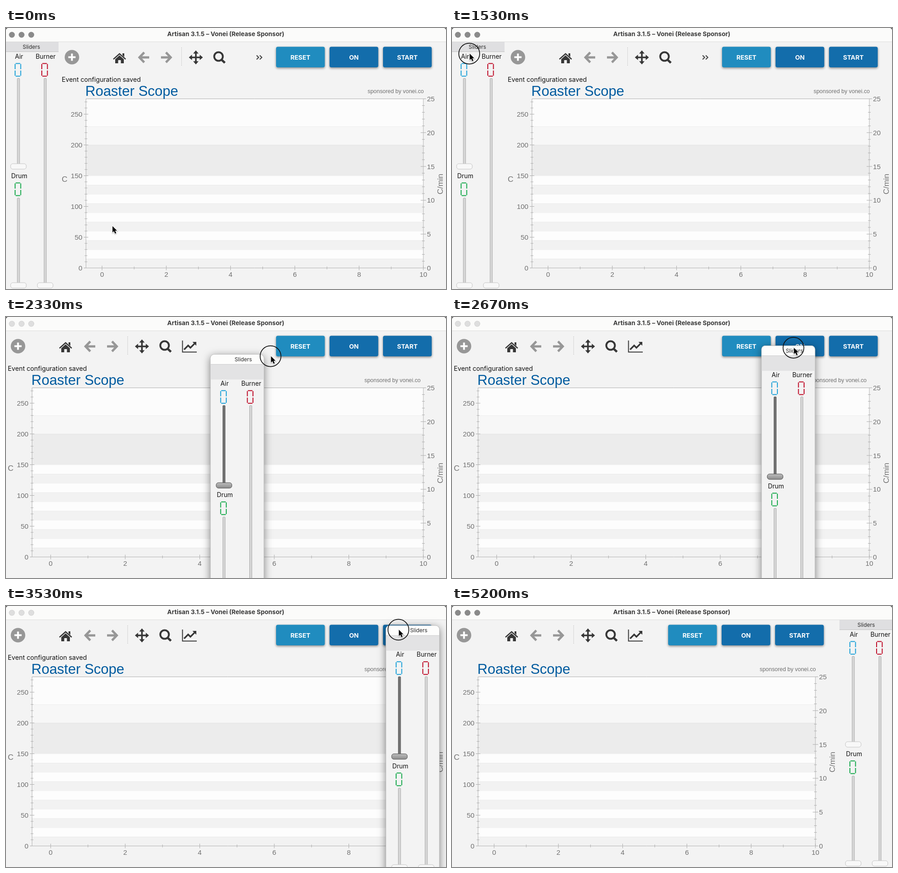
An HTML page with a canvas for the animation above (5270 ms loop, 971 px wide and 577 px high).

```html
<!DOCTYPE html>
<html lang="en">
<head>
<meta charset="utf-8">
<title>Roaster Scope</title>
<style>
html, body { margin: 0; width: 100%; height: 100%; overflow: hidden; background: #f3f3f3; }
canvas { display: block; }
</style>
</head>
<body>
<canvas id="stage" width="971" height="577"></canvas>
<script>
const W = 971, H = 577, LOOP = 5270, FRAME = LOOP / 79;
const ctx = document.getElementById('stage').getContext('2d');
const UI = 'Inter, sans-serif', PLOT = '"Liberation Sans", Arial, sans-serif';
const BG = '#f3f3f3', DARK = '#373737', GRAY = '#979797';

// pointer tip: time, x, y
const PATH = [
  [0, 235, 438], [400, 235, 438], [600, 215, 400], [950, 70, 110], [1150, 37, 56],
  [1530, 37, 56], [1790, 159, 96], [1930, 257, 98], [2190, 462, 94], [2330, 582, 87],
  [2600, 740, 70], [2990, 823, 58], [3130, 834, 57], [3500, 870, 52], [3750, 904, 49],
  [4400, 904, 49], [4700, 990, -20], [LOOP, 990, -20]
];
const PRESS = 1400, FLOAT = 1660, RELEASE = 4160, DROP = 4210, DOCK = 4400, CLEAR = 4600, LAG = 140;

const mix = (a, b, k) => a + (b - a) * k;
function ramp(t, start, end) {
  const k = Math.min(1, Math.max(0, (t - start) / (end - start)));
  return k * k * (3 - 2 * k);
}
function pointer(t) {
  const i = Math.max(1, PATH.findIndex(p => p[0] >= t));
  const [t0, x0, y0] = PATH[i - 1], [t1, x1, y1] = PATH[i];
  const k = (t - t0) / (t1 - t0);
  return [mix(x0, x1, k), mix(y0, y1, k)];
}

function text(s, x, y, font, color = '#111', align = 'center') {
  ctx.font = font;
  ctx.fillStyle = color;
  ctx.textAlign = align;
  ctx.fillText(s, x, y);
}
function rect(x, y, w, h, color) {
  ctx.fillStyle = color;
  ctx.fillRect(x, y, w, h);
}
function round(x, y, w, h, r, fill, stroke) {
  ctx.beginPath();
  ctx.roundRect(x, y, w, h, r);
  ctx.fillStyle = fill;
  ctx.fill();
  if (stroke) {
    ctx.strokeStyle = stroke;
    ctx.lineWidth = 1;
    ctx.stroke();
  }
}
function disc(x, y, r, color) {
  ctx.beginPath();
  ctx.arc(x, y, r, 0, 7);
  ctx.fillStyle = color;
  ctx.fill();
}
function line(d, color, width) {
  ctx.strokeStyle = color;
  ctx.lineWidth = width;
  ctx.stroke(new Path2D(d));
}
function shape(d, color) {
  ctx.fillStyle = color;
  ctx.fill(new Path2D(d));
}
function shadow(blur, dy, alpha) {
  ctx.shadowColor = `rgba(0,0,0,${alpha})`;
  ctx.shadowBlur = blur;
  ctx.shadowOffsetY = dy;
}

function titleBar(active) {
  rect(0, 0, W, 6, '#444');
  round(0, 0, W, 30, [5, 5, 0, 0], '#fbfbfa');
  rect(0, 30, W, 1, '#dcdcdc');
  for (const x of [13, 34.3, 55.7]) {
    disc(x, 15, 6.5, active ? '#8a8a8a' : '#cfcfcf');
    if (!active) disc(x, 15, 5.7, '#dedede');
  }
  text('Artisan 3.1.5 – Vonei (Release Sponsor)', 485, 18, 'bold 13.6px ' + UI, '#3a3a3a');
}

function toolbar(left, right) {
  ctx.save();
  ctx.translate(left, 0);
  disc(26.5, 64.5, 16, GRAY);
  line('M18.5 64.5H34.5M26.5 56.5V72.5', '#fff', 4);
  line('M118 69L131.5 57L145 69', DARK, 2.6);
  shape('M138 56h4v8l-4-4zM122 69L131.5 60.5L141 69V78H134.5V71H128.5V78H122Z', DARK);
  line('M186 54L175.5 65L186 76M176 65H197M234 54L244.5 65L234 76M244 65H223', GRAY, 5);
  ctx.setLineDash([1, 2]);
  line('M268.5 43V84', '#999', 1);
  ctx.setLineDash([]);
  line('M288 65H312M300 53V77', DARK, 3.6);
  shape('M284.5 65l7-6v12zM315.5 65l-7-6v12zM300 49.5l-6 7h12zM300 80.5l-6-7h12z', DARK);
  line('M359.5 63a9.5 9.5 0 1 1-19 0a9.5 9.5 0 1 1 19 0', DARK, 4);
  line('M356.5 70L364 77', DARK, 5);
  if (left < 60) {
    line('M389.5 52V77.5H421', DARK, 2);
    line('M393 72L402 63L407 68L416 59', DARK, 3.4);
    shape('M411.5 55H420V63.5Z', DARK);
  } else {
    line('M434 60.5l4.5 4.5l-4.5 4.5m7-9l4.5 4.5l-4.5 4.5', '#484848', 2.2);
  }
  ctx.restore();

  ['RESET', 'ON', 'START'].forEach((label, i) => {
    const x = 596 - right + i * 118;
    ctx.save();
    shadow(5, 2, 0.45);
    round(x, 41.5, 107.5, 45.5, 4, i ? '#136dab' : '#208cbf');
    ctx.restore();
    text(label, x + 53.7, 69.5, 'bold 13.8px ' + UI, '#fff');
  });
}

function chart(left, right, message) {
  const xl = 57.5 + left, xr = 921 - right, w = xr - xl, top = 156.5, base = 530.5;
  const X = v => xl + (v + 0.5) / 10.5 * w, Y = v => base - v * 1.36;
  const band = (lo, hi, color) => {
    rect(xl, Y(hi), w, Y(lo) - Y(hi), color);
    rect(xl, Y(hi), w, 1, 'rgba(0,0,0,.045)');
  };
  band(230, 275, '#fcfcfc');
  band(200, 230, '#f7f7f7');
  band(150, 200, '#ececec');
  for (let v = 0; v < 150; v += 15) band(v, v + 15, v % 30 ? '#fdfdfd' : '#f2f2f2');

  let ticks = '';
  const label = '15.3px ' + PLOT, ink = '#707070';
  for (let v = 0; v <= 270; v += 10) {
    const r = v % 50 ? 3 : 5;
    ticks += `M${xl - r} ${Y(v)}h${2 * r}`;
  }
  for (let v = 0; v <= 250; v += 50) text(v, xl - 8, Y(v) + 5.5, label, ink, 'right');
  for (let v = 0; v <= 25; v++) {
    const r = v % 5 ? 3 : 6, y = base - v * 14.96;
    ticks += `M${xr - r} ${y}h${2 * r}`;
    if (v % 5 === 0) text(v, xr + 8, y + 5.5, label, ink, 'left');
  }
  for (let v = 0; v <= 10; v++) {
    const r = v % 2 ? 3 : 5;
    ticks += `M${X(v)} ${base - r}v${2 * r}`;
    if (v % 2 === 0) text(v, X(v), 549.5, label, ink);
  }
  line(ticks, '#a9a9a9', 1);
  line(`M${xl} ${top}H${xr}V${base}H${xl}Z`, '#b2b2b2', 1);

  text('C', 4 + left, 340, '17.4px ' + PLOT, ink, 'left');
  ctx.save();
  ctx.translate(964 - right, 345);
  ctx.rotate(-Math.PI / 2);
  text('C/min', 0, 0, '17.4px ' + PLOT, ink);
  ctx.restore();
  text('Roaster Scope', xl - 1.5, 150, '31px ' + PLOT, '#005b9f', 'left');
  text('sponsored by vonei.co', xr + 1 - 7 * (w - 744.5) / 119, 143.5, '12.4px ' + PLOT, ink, 'right');
  if (message) text('Event configuration saved', 4 + left, 118.5, '14.2px ' + UI, '#111', 'left');
}

function zero(x, y, color) {
  line(`M${x - 5} ${y - 14}h10M${x - 5} ${y + 14}h10` +
    [-6.2, 6.2].map(d => `M${x + d} ${y - 13}v11.5M${x + d} ${y + 1.5}v11.5`).join(''), color, 2);
}
function slider(x, y0, y1, dark) {
  round(x - 2.5, y0, 5, y1 - y0, 1, dark ? '#747474' : '#d8d8d8', dark ? '#525252' : '#a6a6a6');
  let fill = '#f8f8f8';
  if (dark) {
    fill = ctx.createLinearGradient(0, y1 - 6, 0, y1 + 6);
    fill.addColorStop(0, '#bdbdbd');
    fill.addColorStop(1, '#8c8c8c');
  }
  round(x - 17.3, y1 - 6, 34.6, 12, 5, fill, dark ? '#4c4c4c' : '#c4c4c4');
}
function sliders(x, y, floating) {
  ctx.save();
  ctx.translate(x, y);
  if (floating) {
    ctx.save();
    shadow(18, 4, 0.5);
    round(-2.5, -1.5, 118, 560, 8, BG);
    ctx.restore();
    round(-2.5, -1.5, 118, 560, 8, BG, '#bcbcbc');
    round(-2, -1, 117, 21, [8, 8, 0, 0], '#fdfdfc');
    rect(-2, 20, 117, 34, '#e3e3e4');
    rect(-2, 20, 117, 1, '#cfcfcf');
  } else {
    rect(-3, 31, 119, 546, BG);
    rect(-3, 31, 119, 21, '#dfdfe1');
    rect(-3, 52, 119, 1, '#c2c2c2');
  }
  text('Sliders', floating ? 70 : 56, floating ? 13.5 : 46, '11.9px ' + UI, '#2a2a2a');
  const font = '13.8px ' + UI, d = floating ? 18 : 0;
  text('Air', 28.7, 67.5, font);
  text('Burner', 87.5, 67.5, font);
  text('Drum', 29.3, 332 - d, font);
  zero(26.3, 92.5, '#1aa0d8');
  zero(85.2, 92.5, '#be0a26');
  zero(26.3, 356.5 - d, '#15a84a');
  slider(27.5, 111.5, 306 - d, floating);
  slider(27.5, 376 - d, 569 - 2 * d, false);
  slider(86.5, 111.5, 569 - 2 * d, false);
  ctx.restore();
}

function cursor(x, y, pressed) {
  if (pressed) {
    ctx.beginPath();
    ctx.arc(x - 1, y, 23, 0, 7);
    ctx.strokeStyle = '#111';
    ctx.lineWidth = 1.7;
    ctx.stroke();
  }
  ctx.save();
  ctx.translate(x, y);
  const arrow = 'M0 0V14L3.2 11L5.6 16.6L8.2 15.5L5.8 10H10Z';
  shadow(2, 1, 0.35);
  line(arrow, '#fff', 2);
  ctx.restore();
  ctx.save();
  ctx.translate(x, y);
  shape(arrow, '#000');
  ctx.restore();
}

function draw(t) {
  const floating = t >= FLOAT && t < DOCK;
  const left = 119 * (1 - ramp(t, 1690, 1870));
  const right = 119 * ramp(t, 3500, 3700);
  rect(0, 0, W, H, BG);
  chart(left, right, t < CLEAR);
  toolbar(left, right);
  if (floating) {
    if (left > 3) rect(0, 31, left - 3, H, '#d0d0d0');
    if (right > 4) rect(975 - right, 31, right, H, '#d0d0d0');
  }
  titleBar(!floating);
  if (floating) {
    const [px, py] = pointer(t - LAG), k = ramp(t, DROP, DOCK);
    sliders(mix(px - 12.5, 858, k), mix(py - 9.5, 18, k), true);
  } else {
    sliders(t < FLOAT ? 0 : 858, 0, false);
  }
  const [x, y] = pointer(t);
  cursor(x, y, t >= PRESS && t < RELEASE);
}

const start = performance.now();
function tick() {
  const t = (performance.now() - start) % LOOP;
  draw(Math.min(78, Math.floor((t + 4) / FRAME)) * FRAME);
  requestAnimationFrame(tick);
}
tick();
</script>
</body>
</html>
```
